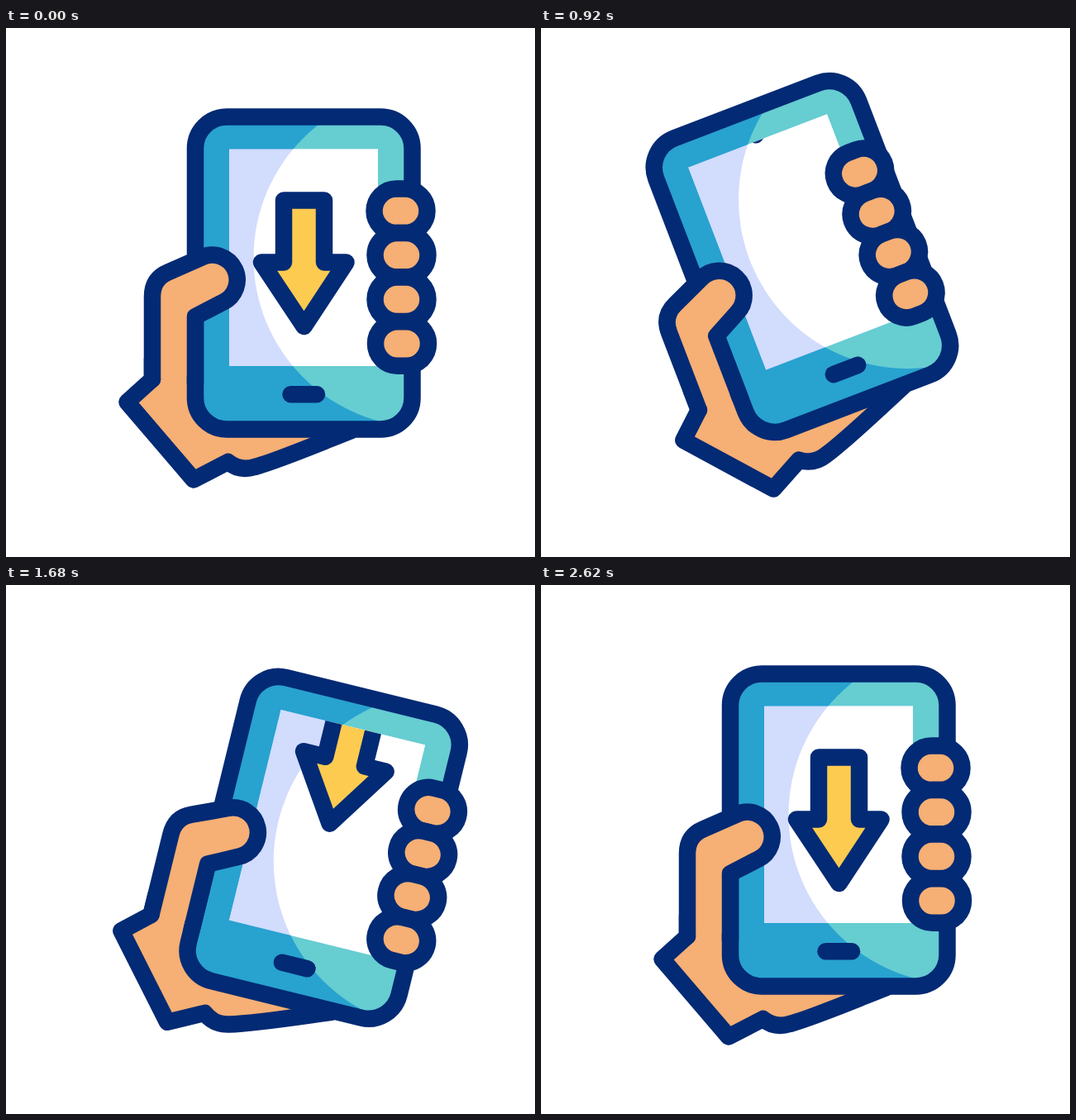
Animation, 640 px wide and 640 px high, one loop 2820 ms. Source, as an HTML page:

```html
<!DOCTYPE html>
<html lang="en">
<head>
<meta charset="utf-8">
<title>Phone shake</title>
<style>
  html, body { margin: 0; width: 100%; height: 100%; overflow: hidden; background: #fff; }
  svg { display: block; width: 100%; height: 100%; }
  .line { stroke: #032a74; stroke-width: 20.5; stroke-linecap: round; stroke-linejoin: round; }
  .skin { fill: #f6af74; }
  .gold { fill: #fdcb50; }
  .open { fill: none; }
</style>
</head>
<body>
<svg viewBox="0 0 640 640">
  <defs>
    <clipPath id="body"><rect x="229" y="107.5" width="262.5" height="378" rx="38"/></clipPath>
    <clipPath id="screen"><rect x="270" y="146.5" width="180" height="262.5"/></clipPath>
  </defs>
  <g id="all">
    <g id="sparks" stroke="#fdcb50" stroke-width="20" stroke-linecap="round"></g>

    <path class="line skin" d="M229 400H177V425L146.500 452.500L227 546.500L268.500 525C277 532 288 535 301 531C330 523 380 502 418 487L300 440Z"/>

    <g clip-path="url(#body)">
      <rect x="219" y="97" width="284" height="400" fill="#28a2cf"/>
      <circle cx="504" cy="278" r="204.500" fill="#66cdd1"/>
    </g>
    <g clip-path="url(#screen)">
      <rect x="270" y="146" width="181" height="264" fill="#d2dcfd"/>
      <circle cx="504" cy="278" r="204.500" fill="#fff"/>
      <path id="arrow" class="line gold" d="M336 208.500H385V283.500H411.500L360.500 361L309 283.500H336Z"/>
    </g>
    <path class="line" d="M344.500 443.300H376"/>
    <rect class="line open" x="229" y="107.500" width="262.500" height="378" rx="38"/>

    <path class="skin" d="M177 425V325C177 310 184 300.500 196 295.500L236.700 277.600A30 30 0 0 1 262.700 331.700L229 349V420Z"/>
    <path class="line open" d="M177 425V325C177 310 184 300.500 196 295.500L236.700 277.600A30 30 0 0 1 262.700 331.700L229 349V430"/>

    <g id="fingers"></g>
  </g>
</svg>
<script>
const LOOP = 2820, STEP = 20;
const PIVOT = "284 406";

// Keys are [time, value] pairs
const TILT = [[200, 0], [360, -13.2], [500, -18.8], [740, -20.4], [920, -21], [1020, -21.5],
  [1280, -6.2], [1460, 10.9], [1605, 16.4], [1860, -0.5], [2005, -8.4], [2140, -2.4],
  [2350, 2.7], [2620, 0]];
const GRIP = [[280, 0], [360, -2.9], [830, -12.8], [920, -15.7], [1100, -17],
  [1370, -10.4], [1460, -6.2], [1640, 0]];
const SPARK_BACK = [[1820, 52], [1860, 42], [2000, 9], [2140, 0]];
const SPARK_LEN = [[1820, 2], [1860, 4], [2140, 11]];
const SPARK_ALPHA = [[1820, 0], [1860, 0.31], [1960, 1], [2180, 1], [2340, 0]];

// End position and heading of each spark
const SPARKS = [[450, 36, 0, -1], [537, 61, 0.68, -0.73], [567, 146, 1, 0]];
const FINGERS = [[477.5, 221.3], [478.5, 274.8], [478.5, 328.3], [479, 382]];
const FINGER_LAG = 30;

const $ = id => document.getElementById(id);

function add(parent, tag, attrs) {
  const el = document.createElementNS("http://www.w3.org/2000/svg", tag);
  set(el, attrs);
  return parent.appendChild(el);
}

function set(el, attrs) {
  for (const k in attrs) el.setAttribute(k, attrs[k]);
}

const slope = (a, b) => (b[1] - a[1]) / (b[0] - a[0]);

// Smooth tangent that is flat at peaks and ends
function tangent(keys, i) {
  if (i === 0 || i === keys.length - 1) return 0;
  const a = slope(keys[i - 1], keys[i]), b = slope(keys[i], keys[i + 1]);
  return a * b > 0 ? 2 * a * b / (a + b) : 0;
}

function curve(keys, t) {
  const last = keys.length - 1;
  if (t <= keys[0][0]) return keys[0][1];
  if (t >= keys[last][0]) return keys[last][1];
  let i = 0;
  while (t > keys[i + 1][0]) i++;
  const [t0, a] = keys[i], [t1, b] = keys[i + 1];
  const d = t1 - t0, u = (t - t0) / d, v = 1 - u;
  return a * v * v * (1 + 2 * u) + b * u * u * (3 - 2 * u)
    + d * u * v * (v * tangent(keys, i) - u * tangent(keys, i + 1));
}

function ease(t, from, to) {
  const u = Math.min(1, Math.max(0, (t - from) / (to - from)));
  return (1 - Math.cos(Math.PI * u)) / 2;
}

// The arrow drops out below, then re-enters from above
function arrowY(t) {
  return t < 900 ? 222 * ease(t, 210, 660) : -222 * (1 - ease(t, 1075, 2180));
}

const fingers = FINGERS.map(([x, y]) => add($("fingers"), "rect", {
  class: "line skin", x: x - 32, y: y - 26.75, width: 64, height: 53.5, rx: 26.75
}));
const sparks = SPARKS.map(() => add($("sparks"), "line", {}));

function draw(t) {
  set($("all"), { transform: `rotate(${curve(TILT, t)} ${PIVOT})` });
  set($("arrow"), { transform: `translate(0 ${arrowY(t)})` });

  fingers.forEach((el, i) => {
    const dx = curve(GRIP, t - i * FINGER_LAG);
    set(el, { transform: `translate(${dx} ${-0.3 * dx})` });
  });

  const back = curve(SPARK_BACK, t), half = curve(SPARK_LEN, t) / 2;
  set($("sparks"), { opacity: curve(SPARK_ALPHA, t) });
  sparks.forEach((el, i) => {
    const [x, y, dx, dy] = SPARKS[i];
    const near = back + half, far = back - half;
    set(el, { x1: x - dx * near, y1: y - dy * near, x2: x - dx * far, y2: y - dy * far });
  });
}

const start = performance.now();
function tick() {
  const t = (performance.now() - start) % LOOP;
  draw(Math.floor(t / STEP) * STEP);
  requestAnimationFrame(tick);
}
tick();
</script>
</body>
</html>
```
